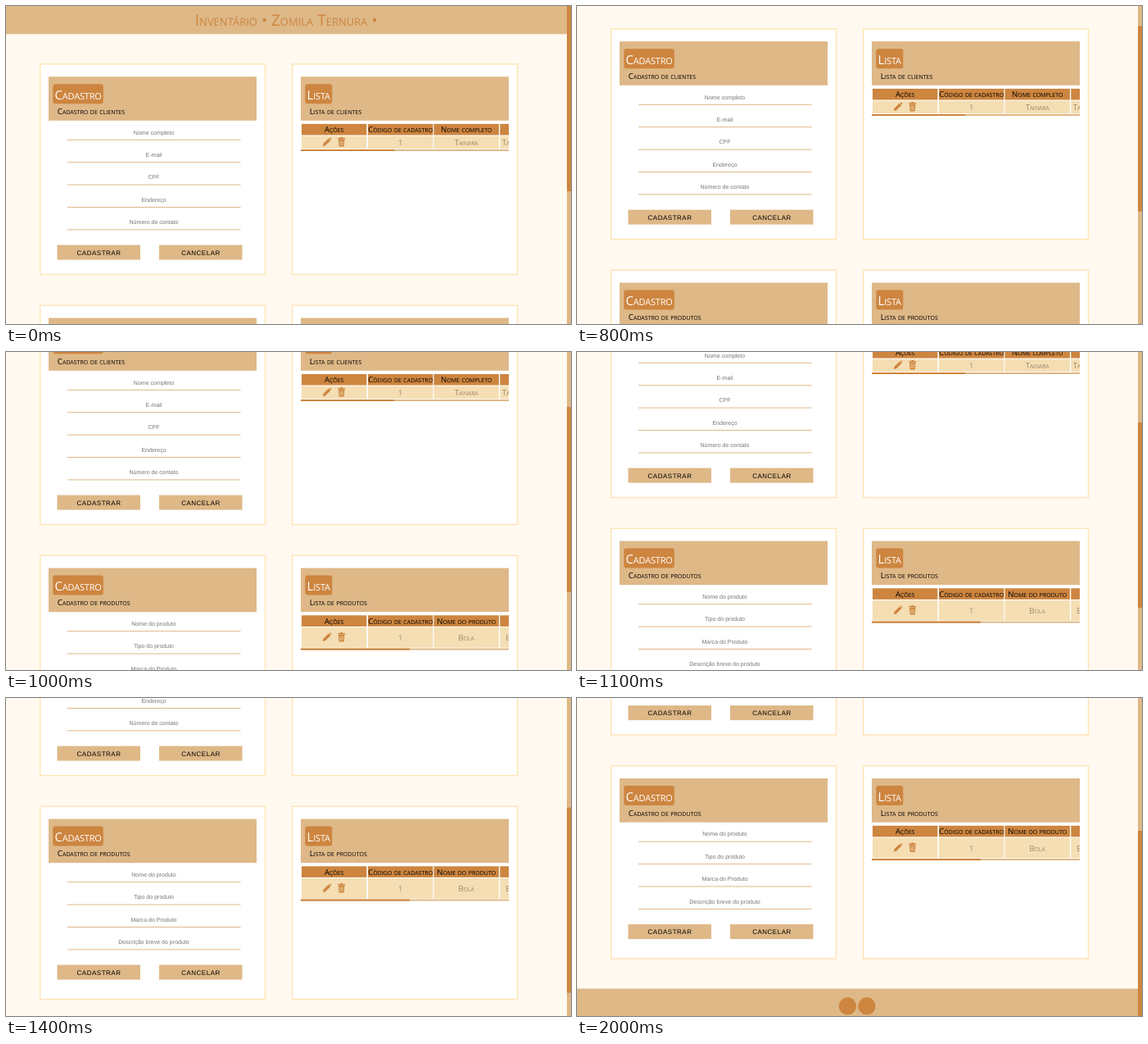
Animation of 690 by 388 pixels, one loop 2.4 s. Source, as an HTML page:

```html
<!DOCTYPE html>
<html lang="pt-BR">
<head>
<meta charset="utf-8">
<title>Inventário</title>
<style>
  html, body { margin: 0; width: 100%; height: 100%; overflow: hidden; background: #fff9f0; }
  svg { display: block; width: 690px; height: 388px; text-rendering: geometricPrecision; }
  .caps { font-family: "Open Sans", "Noto Sans", sans-serif; font-variant: small-caps; }
  .title { font-size: 19px; fill: #cd853f; }
  .badge { font-size: 15px; letter-spacing: -.2px; fill: #fff; }
  .sub { font-size: 9.75px; }
  .head { font-size: 9.6px; }
  .cell { font-size: 9.6px; font-weight: 300; fill: #6b5a45; }
  .field, .button { font-family: "Liberation Sans", Arial, sans-serif; }
  .field { font-size: 7.05px; fill: #757575; }
  .button { font-size: 8px; letter-spacing: .5px; }
  .mid { text-anchor: middle; }
</style>
</head>
<body>
<svg viewBox="0 0 690 388">
  <defs>
    <clipPath id="table"><rect x="360" y="0" width="254" height="260"/></clipPath>
    <g id="pencil" fill="#cd853f">
      <path d="M-4.4 2L2-4.2 4.4-1.8-2 4.4-5.2 5.2Z"/>
      <path d="M2.7-4.9Q3.6-5.7 4.4-5L5.2-4.2Q5.8-3.4 5.1-2.5Z"/>
    </g>
    <g id="trash">
      <path fill="#cd853f" d="M-4.4-4.7h2.6l.7-1h2.2l.7 1h2.6v1.3h-8.8zM-3.7-2.7h7.4l-.5 7.4q-.1 1-1 1h-4.4q-.9 0-1-1z"/>
      <path stroke="#f5deb3" stroke-width=".7" d="M-1.7-1.3v5.6M0-1.3v5.6M1.7-1.3v5.6"/>
    </g>
  </defs>
  <g id="page"></g>
  <rect x="685" width="5" height="388" fill="#deb887"/>
  <rect id="thumb" x="685" width="5" height="226" fill="#cd853f"/>
</svg>
<script>
const TAN = '#deb887', PERU = '#cd853f', WHEAT = '#f5deb3';
const MAX_SCROLL = 282.5, THUMB_TRAVEL = 162;

const rect = (x, y, w, h, fill, extra = '') =>
  `<rect x="${x}" y="${y}" width="${w}" height="${h}" fill="${fill}" ${extra}/>`;
const text = (x, y, cls, str) => `<text x="${x}" y="${y}" class="${cls}">${str}</text>`;

// Card frame with its heading; coordinates are relative to the card's top edge.
function card(x, height, title, badgeWidth, subtitle) {
  return rect(x + .7, .7, 274.8, height - 1.4, '#fff', 'stroke="#ffe4b5" stroke-width="1.4"') +
    rect(x + 11, 16, 254, 53.6, TAN) +
    rect(x + 16.3, 25, badgeWidth, 24, PERU, 'rx="3"') +
    text(x + 18.6, 43.6, 'caps badge', title) +
    text(x + 21.8, 61.8, 'caps sub', subtitle);
}

function form(height, subtitle, fields) {
  const inputs = fields.map((label, i) => {
    const y = 27.4 * i;
    return text(180.5, y + 86.4, 'field mid', label) + rect(75, y + 92.6, 211.5, 1, TAN);
  }).join('');
  const top = 84.4 + 27.4 * fields.length;
  const button = (x, label) =>
    rect(x, top, 101.5, 18, TAN) + text(x + 51, top + 12.1, 'button mid', label);
  return card(41, height, 'Cadastro', 61.5, subtitle) + inputs +
    button(62.5, 'CADASTRAR') + button(187, 'CANCELAR');
}

function list(height, subtitle, nameHeader, name, next, nextX, rowHeight, thumbWidth) {
  const columns = [361, 442, 522.5, 603.3];
  const rowMid = 88.5 + rowHeight / 2;
  const cells = columns.map(x =>
    rect(x, 73.7, 79.4, 13.6, PERU) + rect(x, 88.4, 79.4, rowHeight, WHEAT)).join('');
  const headers = ['Ações', 'Código de cadastro', nameHeader]
    .map((label, i) => text(columns[i] + 39.7, 84, 'caps head mid', label)).join('');
  const barY = 89.2 + rowHeight;
  return card(349, height, 'Lista', 33, subtitle) +
    `<g clip-path="url(#table)">${cells}${headers}
      <use href="#pencil" x="392" y="${rowMid - .7}"/><use href="#trash" x="409.7" y="${rowMid - .7}"/>` +
    text(481.7, rowMid + 3.6, 'caps cell mid', '1') +
    text(562.2, rowMid + 3.6, 'caps cell mid', name) +
    text(nextX, rowMid + 3.6, 'caps cell', next) +
    rect(360, barY, 254, 2, TAN) + rect(360, barY, thumbWidth, 2, PERU) + '</g>';
}

const row = (y, content) => `<g transform="translate(0 ${y})">${content}</g>`;
const page = document.getElementById('page');
const thumb = document.getElementById('thumb');

page.innerHTML =
  rect(0, 0, 685, 34.3, TAN) +
  text(342.2, 24.2, 'caps title mid', 'Inventário • Zomila Ternura •') +
  row(70.2,
    form(258, 'Cadastro de clientes', ['Nome completo', 'E-mail', 'CPF', 'Endereço', 'Número de contato']) +
    list(258, 'Lista de clientes', 'Nome completo', 'Tainara', 'Tainara', 606, 15.6, 114)) +
  row(364.6,
    form(236.6, 'Cadastro de produtos', ['Nome do produto', 'Tipo do produto', 'Marca do Produto', 'Descrição breve do produto']) +
    list(236.6, 'Lista de produtos', 'Nome do produto', 'Bola', 'Esporte', 610.5, 24.8, 133)) +
  rect(0, 637.1, 685, 34, TAN) +
  [330.5, 354].map(x => `<circle cx="${x}" cy="658.4" r="10.6" fill="${PERU}"/>`).join('');

// Scroll offset for each 100 ms step, starting at 500 ms.
const scrollSteps = [0, 2.7, 18, 43, 79, 117, 150, 179, 207, 233, 259, MAX_SCROLL];

function draw() {
  const t = performance.now() % 2400;
  const step = Math.floor((t - 500) / 100);
  const scroll = scrollSteps[Math.max(0, Math.min(scrollSteps.length - 1, step))];
  page.setAttribute('transform', `translate(0 ${-scroll})`);
  thumb.setAttribute('y', scroll / MAX_SCROLL * THUMB_TRAVEL);
  requestAnimationFrame(draw);
}
draw();
</script>
</body>
</html>
```
